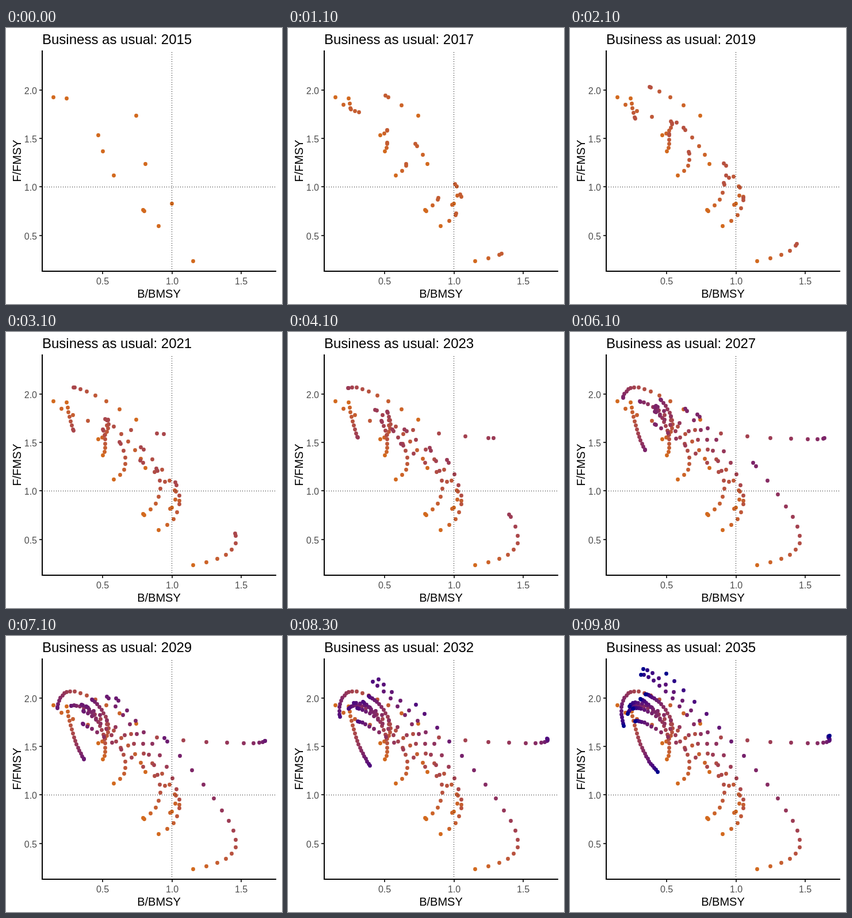
These frames come from a looping animation (480x480 px, 10000 ms). An HTML page with a canvas:

```html
<!DOCTYPE html>
<html lang="en">
<head>
<meta charset="utf-8">
<title>Business as usual</title>
<style>
  html, body { margin: 0; width: 100%; height: 100%; overflow: hidden; background: #fff; }
  canvas { display: block; }
</style>
</head>
<body>
<canvas id="plot" width="480" height="480"></canvas>
<script>
const ctx = document.getElementById('plot').getContext('2d');
const YEARS = 20, FRAME = 100, FRAMES = 100;
const FONT = '"Liberation Sans", Arial, sans-serif';

// Years at which a path's x, y pairs lie, by number of pairs
const knotYears = {
  4: [0, 5, 12, 20],
  6: [0, 2, 5, 10, 15, 20],
  8: [0, 2, 4, 7, 10, 13, 16, 20]
};

const stocks = [
  [82, 120, 116, 144, 175, 162, 308, 181, 413, 186, 446, 183.5, 451, 179, 451, 173],
  [105, 122, 114, 162, 129.5, 204, 152, 235.5],
  [226, 152, 174, 120, 129, 98.5, 97.5, 103, 89, 129.5, 93, 156],
  [160, 186, 171.5, 178, 178, 160, 165.5, 127.5, 146, 108, 130.5, 101],
  [168, 214, 172, 201, 170.5, 178.5, 156, 142.5, 136, 119, 121.5, 108.5],
  [187, 256, 204.5, 239, 204, 206, 164, 151.5, 129, 128, 109, 126],
  [242, 236, 224, 205, 187, 164, 135, 125, 110, 122, 100, 135],
  [238, 316, 259.5, 298, 267, 257.5, 226.5, 169.5, 166, 96, 123, 66.5],
  [240, 318, 300.5, 293, 276, 260, 217.5, 211, 169.5, 175, 141, 156.5, 124, 148.5, 112.5, 148],
  [265, 344, 290.5, 325, 300.5, 283.5, 253.5, 186.5, 180, 97, 127, 57],
  [288, 305, 292.5, 275, 254, 221, 175, 146, 125, 117, 103, 121.5],
  [325, 405, 367, 394, 398.5, 367, 360.5, 282, 258.5, 158.5, 166.5, 65]
];

// Cubic through the four knots around the given year
function locate(path, year) {
  const times = knotYears[path.length / 2];
  const after = times.findIndex(t => t >= year);
  const first = Math.max(0, Math.min(after - 2, times.length - 4));
  let x = 0, y = 0;
  for (let i = first; i < first + 4; i++) {
    let w = 1;
    for (let j = first; j < first + 4; j++)
      if (j !== i) w *= (year - times[j]) / (times[i] - times[j]);
    x += w * path[2 * i];
    y += w * path[2 * i + 1];
  }
  return [x, y];
}

const tracks = stocks.map(path =>
  Array.from({ length: YEARS + 1 }, (_, year) => locate(path, year)));

// Chocolate to dark blue, mixed in CIE Lab
function shade(u) {
  const mix = (a, b) => a + (b - a) * u;
  const fy = (mix(55.99, 14.76) + 16) / 116;
  const fx = fy + mix(37.05, 50.4) / 500;
  const fz = fy - mix(56.7, -68.7) / 200;
  const cube = f => f > 6 / 29 ? f ** 3 : (f - 4 / 29) * 108 / 841;
  const X = 0.9505 * cube(fx), Y = cube(fy), Z = 1.089 * cube(fz);
  const byte = c => {
    c = Math.max(0, Math.min(1, c));
    return Math.round(255 * (c <= 0.0031308 ? 12.92 * c : 1.055 * c ** (1 / 2.4) - 0.055));
  };
  const rgb = [
    3.2406 * X - 1.5372 * Y - 0.4986 * Z,
    -0.9689 * X + 1.8758 * Y + 0.0415 * Z,
    0.0557 * X - 0.204 * Y + 1.057 * Z
  ];
  return `rgb(${rgb.map(byte)})`;
}

function drawYear(year) {
  const from = Math.floor(year), to = Math.min(from + 1, YEARS), u = year - from;
  ctx.fillStyle = shade(year / YEARS);
  for (const track of tracks) {
    const [x, y] = [0, 1].map(k => track[from][k] + (track[to][k] - track[from][k]) * u);
    ctx.beginPath();
    ctx.arc(Math.round(x) + 0.5, Math.round(y) + 0.5, 3.4, 0, 2 * Math.PI);
    ctx.fill();
  }
}

function label(str, x, y, size, align, color = '#000') {
  ctx.font = `${size}px ${FONT}`;
  ctx.textAlign = align;
  ctx.fillStyle = color;
  ctx.fillText(str, x, y);
}

function line(x1, y1, x2, y2, width, color, dash = []) {
  ctx.lineWidth = width;
  ctx.strokeStyle = color;
  ctx.setLineDash(dash);
  ctx.beginPath();
  ctx.moveTo(x1, y1);
  ctx.lineTo(x2, y2);
  ctx.stroke();
}

function drawAxes() {
  line(63, 276.5, 470, 276.5, 1, '#000', [1, 3]);
  line(288.5, 423, 288.5, 39, 1, '#000', [1, 3]);
  ['0.5', '1.0', '1.5', '2.0'].forEach((value, i) => {
    const y = Math.round(360.5 - 84.3 * i);
    line(58, y, 62, y, 2, '#333');
    label(value, 54, y + 7, 16, 'right', '#4d4d4d');
    if (i === 3) return;
    const x = Math.round(168 + 120.5 * i);
    line(x, 424, x, 428, 2, '#333');
    label(value, x, 446, 16, 'center', '#4d4d4d');
  });
  line(63, 39, 63, 424, 2, '#000');
  line(62, 423, 470, 423, 2, '#000');
  label('B/BMSY', 266, 469, 20, 'center');
  ctx.save();
  ctx.translate(26, 231);
  ctx.rotate(-Math.PI / 2);
  label('F/FMSY', 0, 0, 20, 'center');
  ctx.restore();
}

function draw(now) {
  const frame = Math.floor(now / FRAME) % FRAMES;
  // Each year moves in four steps and rests for one; the last takes three
  const from = Math.floor(frame / 5);
  const year = from + Math.min(1, frame % 5 / (from === YEARS - 1 ? 3 : 4));

  ctx.fillStyle = '#fff';
  ctx.fillRect(0, 0, 480, 480);
  for (let past = 0; past < year; past++) drawYear(past);
  drawYear(year);
  drawAxes();
  const shown = Math.round(2015 + frame * YEARS / (FRAMES - 1));
  label('Business as usual: ' + shown, 63, 28, 24, 'left');
}

const start = performance.now();
function tick() {
  draw(performance.now() - start);
  requestAnimationFrame(tick);
}
tick();
</script>
</body>
</html>
```
